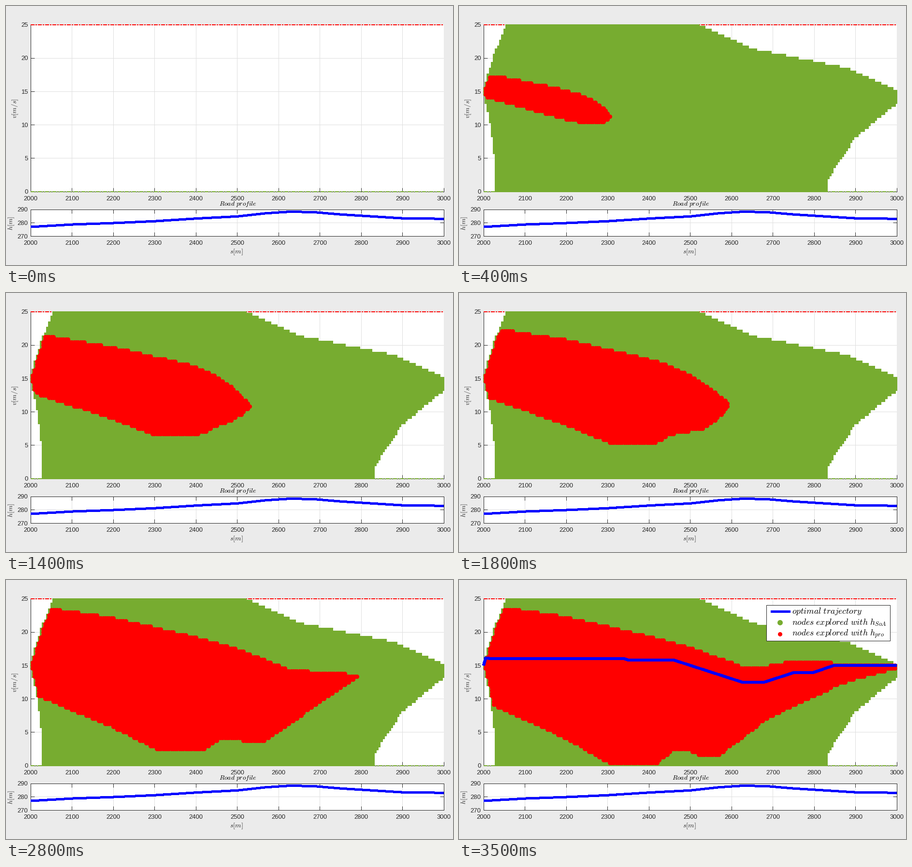
Recreate the animation shown at these times as a matplotlib script. Size 925x537 px, loop 3600 ms.

```python
import numpy as np
import matplotlib.pyplot as plt
from matplotlib.animation import FuncAnimation
from matplotlib.patches import Rectangle

W, H, DPI = 925, 537, 100
PX = 72 / DPI
FRAMES, STEP = 36, 100
DARK, GREEN, RED, BLUE = "#262626", "#77ac30", "#ff0000", "#0000ff"
DS, DV = 5, 25 / 60  # node spacing
DOT = 0.32           # marker radius in m/s

plt.rcParams.update({
    "font.family": "Liberation Sans",
    "font.size": 13 * PX,
    "mathtext.fontset": "cm",
    "axes.axisbelow": True,
    "axes.linewidth": PX,
    "axes.edgecolor": DARK,
})

fig = plt.figure(figsize=(W / DPI, H / DPI), dpi=DPI, facecolor="#ebebeb")


def panel(top, bottom, ylim, yticks, box):
    ax = fig.add_axes([50.9 / W, 1 - bottom / H, 855 / W, (bottom - top) / H])
    ax.set(xlim=(2000, 3000), ylim=ylim, xticks=range(2000, 3001, 100), yticks=yticks)
    ax.set_autoscale_on(False)
    ax.grid(True, color="#dfdfdf", lw=PX)
    ax.tick_params(direction="in", length=8 * PX, width=PX, color=DARK,
                   labelcolor=DARK, top=box, right=box)
    ax.tick_params(axis="x", pad=9 * PX)
    ax.tick_params(axis="y", pad=5.5 * PX)
    for side, spine in ax.spines.items():
        spine.set_zorder(0.6)
        spine.set_visible(box or side in ("left", "bottom"))
    return ax


speed = panel(38.6, 384.6, (0, 25), range(0, 26, 5), False)
road = panel(422, 477, (270, 290), (270, 280, 290), True)

page = fig.add_axes([0, 0, 1, 1], zorder=5)
page.set(xlim=(0, W), ylim=(H, 0))
page.set_autoscale_on(False)
page.axis("off")


def label(x, y, text, size, **kw):
    opts = dict(ha="center", va="center", color=DARK) | kw
    return page.text(x, y, text, fontsize=size * PX, **opts)


def thick_line(ax, points, width, **kw):
    return ax.plot(*zip(*points), color=BLUE, lw=width * PX, antialiased=False,
                   solid_capstyle="butt", zorder=4, **kw)


def curve(x, points):
    return np.interp(x, *zip(*points))


label(18.5, 212, r"$v[m/s]$", 14.2, rotation=90)
label(11, 450.5, r"$h[m]$", 14.2, rotation=90)
label(477, 510, r"$s[m]$", 14.2)
label(480, 411, r"$Road\ profile$", 13.6, color="black")

thick_line(road, [(2000, 276.9), (2100, 278.7), (2200, 279.8), (2300, 281.2),
                  (2400, 283.2), (2500, 284.8), (2570, 287.2), (2630, 288.4),
                  (2690, 287.9), (2750, 286.3), (2900, 283.4), (3000, 283)], 4)

# Speed limits
for v, color in ((25, RED), (0, GREEN)):
    speed.plot([2000, 3000], [v, v], color=color, lw=2 * PX, clip_on=False,
               dashes=(4, 1, 1.5, 1), dash_capstyle="butt", zorder=1.5)

# Reachable nodes: constant acceleration from 15 m/s on the left, key points on the right
cols = np.arange(2000, 3001, DS)
rows = np.arange(61) * DV
left = 2000 + np.abs(rows ** 2 - 15 ** 2) / 7
right = curve(rows, [(0, 2828), (2, 2833), (8, 2897), (13.3, 3000), (15.1, 3000),
                     (18.4, 2885), (20.4, 2731), (21.3, 2655), (25, 2521)])
left, right = (np.round(edge / DS) * DS for edge in (left, right))

start = np.maximum(left - 2.4, 1998.9)
low = np.maximum(rows - DV / 2, -0.1)
high = np.minimum(rows + DV / 2, 25.05)
green = speed.barh(low, np.minimum(right + 2.4, 3001.2) - start, left=start,
                   height=high - low, align="edge", color=GREEN, lw=0,
                   antialiased=False, clip_on=False, zorder=2)

# The other search spreads from an axis towards its final bounds
axis = curve(cols, [(2000, 15.5), (2300, 11.3), (2530, 10.8), (2650, 11.2),
                    (2800, 13.5), (3000, 14.9)])
upper = curve(cols, [(2050, 23.8), (2200, 22.4), (2400, 19.5), (2500, 17.8),
                     (2620, 15.1), (2690, 15.1), (2740, 15.8), (3000, 15.6)])
lower = curve(cols, [(2018, 9.1), (2200, 3.9), (2310, 0), (2415, 0), (2455, 2),
                     (2500, 2), (2530, 1.2), (2565, 1.2), (2690, 7), (2870, 12),
                     (3000, 14.2)])

S, V = np.meshgrid(cols, rows)
inner = ((S >= left[:, None] + DS) & (S <= right[:, None] - DS)
         & (V > 0) & (V < 25))
red, = speed.plot([], [], "o", ms=9 * PX, mew=0, color=RED, zorder=3)


def explored(u):
    reach = max(790 * u ** 0.43 + 300 * u ** 6, 1)
    taper = 1 - ((cols - 2000) / reach) ** 9
    rise = (1 - (1 - u) ** 2.6) * taper
    fall = (0.17 + 0.83 * u ** 1.2) * taper
    top = axis + (upper - axis) * rise - DOT
    bottom = axis + (lower - axis) * fall + DOT
    return inner & (V <= top + DV / 2) & (V >= bottom - DV / 2)


# Result and legend, shown at the end
result = thick_line(speed, [(2000, 15), (2005, 16.1), (2020, 16), (2340, 16),
                            (2350, 15.8), (2460, 15.8), (2625, 12.5), (2680, 12.5),
                            (2750, 13.9), (2797, 13.9), (2848, 15), (3000, 15)],
                    5, clip_on=False)
result.append(page.add_patch(Rectangle((636, 52), 256, 74, fc="white", ec=DARK, lw=PX)))
result += thick_line(page, [(645, 65), (685, 65)], 5)
result += page.plot(664, 88, "o", color=GREEN, ms=11 * PX, mew=0)
result += page.plot(664, 112, "o", color=RED, ms=9 * PX, mew=0)
for i, text in enumerate((r"$optimal\ trajectory$",
                          r"$nodes\ explored\ with\ h_{SoA}$",
                          r"$nodes\ explored\ with\ h_{pro}$")):
    result.append(label(689, 70 + 23 * i, text, 17.6, ha="left", va="baseline",
                        color="black"))


def draw(i):
    mask = explored(i / (FRAMES - 1))
    red.set_data(S[mask], V[mask])
    for bar in green:
        bar.set_visible(i > 0)
    for part in result:
        part.set_visible(i == FRAMES - 1)
    return [red, *green, *result]


anim = FuncAnimation(fig, draw, frames=FRAMES, interval=STEP, repeat=True, repeat_delay=0)
plt.show()
```
